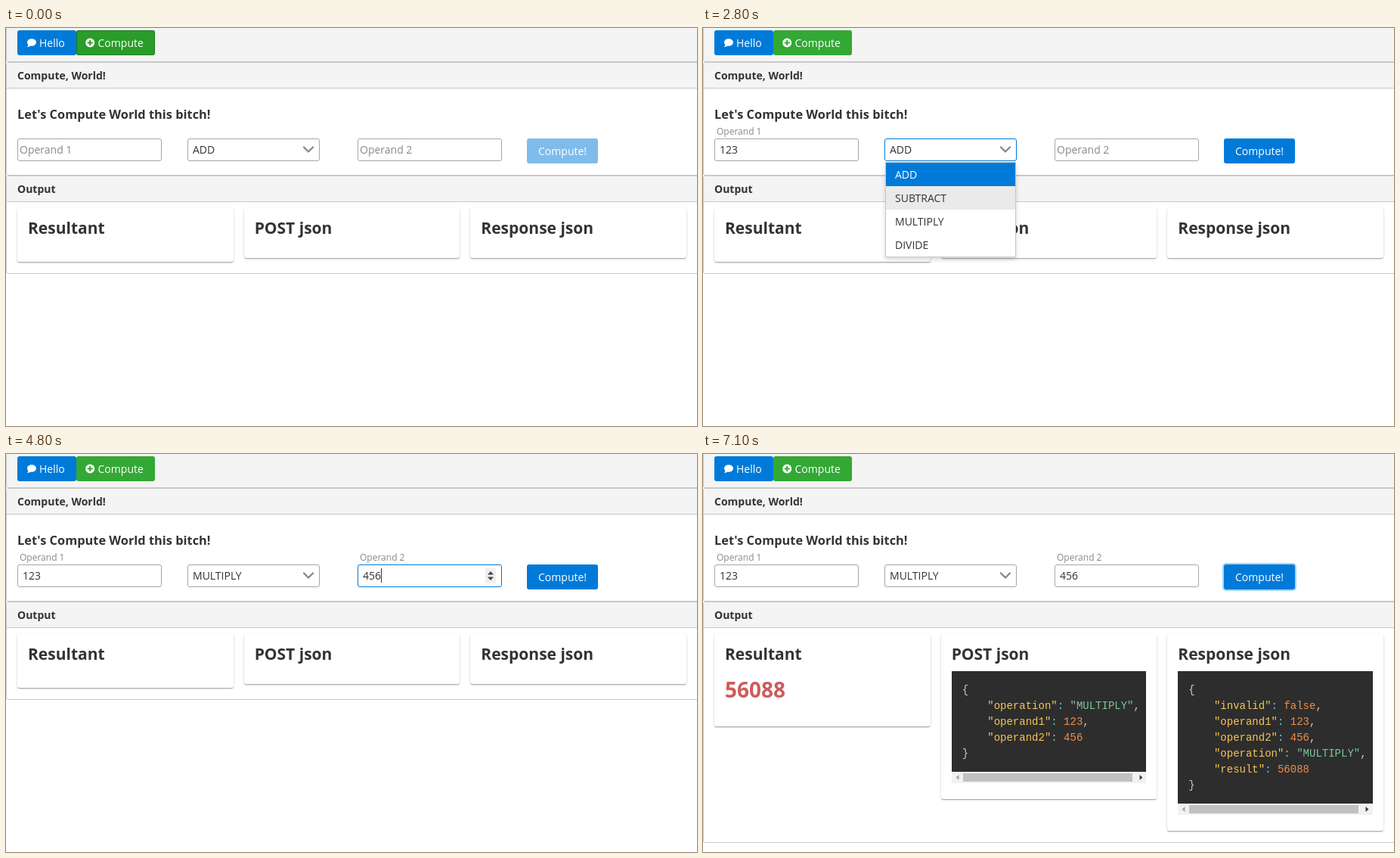
An HTML page that plays this animation: 914x526 px, repeating every 7.2 s.

```html
<!DOCTYPE html>
<html lang="en">
<head>
<meta charset="utf-8">
<title>Compute, World!</title>
<style>
html, body { margin: 0; width: 100%; height: 100%; overflow: hidden; background: #fff; }
body { position: relative; font: 14px "Open Sans", sans-serif; color: #333; }
div, span, svg, h3, pre, i { position: absolute; box-sizing: border-box; margin: 0; white-space: pre; }
b { font-weight: 700; }

/* every animation shares one clock: 1% = 72 ms */
.a { animation: 7.2s step-end infinite; }

.bar, .panel { left: 0; width: 960px; border: 1px solid #c8c8c8; border-radius: 3px; }
.bar { top: -20px; height: 65px; background: #f4f4f4; }
.head { left: 0; top: 0; width: 100%; height: 34px; background: #f4f4f4; border-bottom: 1px solid #c8c8c8; }
.head b { position: absolute; left: 14px; top: 7px; }

.btn { height: 33px; border-radius: 3px; background: #007ad9; color: #fff; }
.btn span { top: 7px; }
.field { top: 146px; height: 30px; border: 1px solid #a6a6a6; border-radius: 3px; background: #fff; }
.field > span { left: 6px; top: 4px; }
.label { color: #898989; top: 151px; }
.typed { overflow: hidden; width: 0; height: 19px; box-sizing: content-box; border-right: 1px solid transparent; }
.spin { right: 7px; top: 4px; width: 14px; height: 20px; background: #efefef; visibility: hidden; }
.spin svg { left: 0; top: 0; }

.card { top: 238px; width: 285.67px; border-radius: 3px; background: #fff; height: var(--h0); animation-name: grow;
  box-shadow: 0 1px 3px rgba(0,0,0,.2), 0 1px 1px rgba(0,0,0,.14), 0 2px 1px -1px rgba(0,0,0,.12); }
.card h3 { left: 14px; top: 12px; font-size: 21px; }
.out { visibility: hidden; animation-name: out; }
.result { left: 14px; top: 54px; font-size: 28px; font-weight: 700; color: #cd5c5c; }
pre { left: 14px; top: 49px; width: 257.67px; padding: 15px 14px 13px; overflow: hidden; background: #2d2d2d; color: #ccc;
  font: 14px/21px "Liberation Mono", monospace; }
pre * { position: static; font-style: normal; }
pre b { font-weight: 400; color: #f8c555; }
pre i { color: #f08d49; }
pre s { color: #7ec699; text-decoration: none; }
pre u { color: #67cdcc; text-decoration: none; }
.scroll { left: 14px; width: 257.67px; height: 15px; background: #f1f1f1; }
.scroll svg { left: 0; top: 0; }

.menu { left: 241px; top: 177px; width: 173px; height: 126px; border: 1px solid #c8c8c8; background: #fff;
  box-shadow: 0 3px 6px rgba(0,0,0,.16); opacity: 0; animation-name: menu; }
.menu div { left: 0; width: 100%; height: 31px; }
.menu span { left: 12px; top: 6px; }

#go { animation-name: go; --ring: 0 0 0 2.8px #8dcdff; }
#add { animation-name: add; }
#op1 { animation-name: op1; }
#sel { animation-name: sel; }
#op2 { animation-name: op2; }
#lab1 { animation-name: lab1; }
#lab2 { animation-name: lab2; }
#num1 { animation-name: num1; }
#num2 { animation-name: num2; }
#spin1 { animation-name: spin1; }
#spin2 { animation-name: spin2; }
#was { animation-name: was; }
#now { visibility: hidden; animation-name: now; }
#sub { animation-name: sub; }
#mul { animation-name: mul; }

@keyframes add {
  0% { background: #299c2a; outline: 1px dotted #0b5c0c; outline-offset: -1px; }
  1.388%, 94.444% { background: #34a835; outline: 0 none; }
  93.055% { background: #31a432; outline: 0 none; }
}
@keyframes op1 {
  0%, 33.333% { border-color: #a6a6a6; }
  4.166% { border-color: #646464; }
  5.555% { border-color: #212121; }
  8.333% { border-color: #194066; }
  9.722% { border-color: #0966ab; }
  11.111% { border-color: #007ad9; }
  31.944% { border-color: #5390c0; }
}
@keyframes spin1 { 0%, 31.944% { visibility: hidden; } 4.166% { visibility: visible; } }
@keyframes lab1 {
  0% { top: 151px; font-size: 14px; }
  8.333% { top: 147px; font-size: 13.6px; }
  9.722% { top: 133px; font-size: 12.4px; }
  11.111% { top: 128px; font-size: 12px; }
}
@keyframes num1 {
  0%, 15.277% { width: 0; border-color: transparent; }
  11.111% { width: 0; border-color: #333; }
  18.055% { width: 8px; border-color: #333; }
  19.444% { width: 16px; border-color: #333; }
  20.833% { width: 24px; border-color: #333; }
  30.555% { width: 25px; border-color: transparent; }
}
@keyframes sel {
  0%, 26.388%, 58.333% { border-color: #a6a6a6; }
  23.611% { border-color: #646464; }
  25% { border-color: #707070; }
  31.944% { border-color: #5390c0; }
  33.333% { border-color: #007ad9; }
  56.944% { border-color: #5390c0; }
}
@keyframes menu {
  0% { opacity: 0; transform: none; }
  33.333% { opacity: .45; transform: translateY(4px); }
  34.722% { opacity: .88; transform: translateY(1px); }
  36.111% { opacity: 1; transform: none; }
  45.833% { opacity: .75; transform: none; }
  47.222% { opacity: .2; transform: none; }
  48.611% { opacity: 0; transform: none; }
}
@keyframes sub { 0%, 41.666% { background: #fff; } 38.888% { background: #eaeaea; } }
@keyframes mul { 0%, 48.611% { background: #fff; } 41.666% { background: #eaeaea; } }
@keyframes was { 0% { visibility: visible; } 45.833% { visibility: hidden; } }
@keyframes now { 0% { visibility: hidden; } 45.833% { visibility: visible; } }
@keyframes op2 {
  0%, 75% { border-color: #a6a6a6; }
  50% { border-color: #646464; }
  51.388% { border-color: #212121; }
  55.555% { border-color: #194066; }
  56.944% { border-color: #0966ab; }
  58.333% { border-color: #007ad9; }
  73.611% { border-color: #5390c0; }
}
@keyframes spin2 { 0%, 73.611% { visibility: hidden; } 50% { visibility: visible; } }
@keyframes lab2 {
  0% { top: 151px; font-size: 14px; }
  55.555% { top: 147px; font-size: 13.6px; }
  56.944% { top: 133px; font-size: 12.4px; }
  58.333% { top: 128px; font-size: 12px; }
}
@keyframes num2 {
  0% { width: 0; border-color: transparent; }
  58.333% { width: 0; border-color: #333; }
  63.888% { width: 8px; border-color: #333; }
  65.277% { width: 16px; border-color: #333; }
  66.666% { width: 24px; border-color: #333; }
  73.611% { width: 25px; border-color: transparent; }
}
@keyframes go {
  0% { opacity: .5; background: #007ad9; box-shadow: none; }
  18.055% { opacity: 1; background: #007ad9; box-shadow: none; }
  72.222% { opacity: 1; background: #0975cc; box-shadow: none; }
  73.611% { opacity: 1; background: #0967b1; box-shadow: 0 0 0 1.4px #8dcdff; }
  75% { opacity: 1; background: #005b9f; box-shadow: var(--ring); }
  76.388% { opacity: 1; background: #0d66af; box-shadow: var(--ring); }
  77.777% { opacity: 1; background: #116fbf; box-shadow: var(--ring); }
  87.5% { opacity: 1; background: #0d72c6; box-shadow: var(--ring); }
  88.888% { opacity: 1; background: #0477d2; box-shadow: var(--ring); }
  90.277% { opacity: 1; background: #007ad9; box-shadow: var(--ring); }
  98.611% { opacity: 1; background: #007ad9; box-shadow: 0 0 0 2.1px rgba(141,205,255,.8); }
}
@keyframes grow { 0% { height: var(--h0); } 76.388% { height: var(--h1); } }
@keyframes out { 0% { visibility: hidden; } 76.388% { visibility: visible; } }
</style>
</head>
<body>
<svg width="0" height="0">
  <symbol id="arrows" viewBox="0 0 14 20"><path d="M3 8.5 7 4l4 4.5zM3 11.5 7 16l4-4.5z" fill="#444"/></symbol>
  <symbol id="track" viewBox="0 0 258 15">
    <path d="M15 2h224v11H15z" fill="#c1c1c1"/>
    <path d="M9.5 4v7L5.5 7.5z" fill="#a3a3a3"/>
    <path d="M248.5 4v7l4-3.5z" fill="#404040"/>
  </symbol>
</svg>

<div class="bar"></div>
<div class="btn" style="left:15px;top:3px;width:78px">
  <svg width="44" height="33" style="left:0;top:0" fill="#fff"><ellipse cx="19" cy="16" rx="6" ry="4.8"/><path d="M14.5 18q0 2.5-1.5 4 3.5 0 5-2z"/></svg>
  <span style="left:29px">Hello</span>
</div>
<div id="add" class="btn a" style="left:93px;top:3px;width:104px;background:#34a835">
  <svg width="30" height="33" style="left:0;top:0"><path fill="#fff" fill-rule="evenodd" d="M12.2 16.5a6 6 0 1 1 12 0a6 6 0 1 1-12 0zM17.2 13v2.5h-2.5v2h2.5v2.5h2v-2.5h2.5v-2h-2.5v-2.5z"/></svg>
  <span style="left:28.5px">Compute</span>
</div>

<div class="panel" style="top:45px;height:150px"><div class="head"><b>Compute, World!</b></div></div>
<h3 style="left:15px;top:103px;font-size:16.38px">Let's Compute World this bitch!</h3>

<div id="op1" class="field a" style="left:15px;width:191px">
  <span id="num1" class="typed a">123</span>
  <div id="spin1" class="spin a"><svg width="14" height="20"><use href="#arrows"/></svg></div>
</div>
<span id="lab1" class="label a" style="left:18px">Operand 1</span>

<div id="sel" class="field a" style="left:240px;width:175px">
  <span id="was" class="a">ADD</span><span id="now" class="a">MULTIPLY</span>
  <svg width="20" height="20" style="left:149px;top:4px"><path d="M4 6.5 10 12.5l6-6" fill="none" stroke="#848484" stroke-width="2.2" stroke-linecap="round" stroke-linejoin="round"/></svg>
</div>

<div id="op2" class="field a" style="left:465px;width:191px">
  <span id="num2" class="typed a">456</span>
  <div id="spin2" class="spin a"><svg width="14" height="20"><use href="#arrows"/></svg></div>
</div>
<span id="lab2" class="label a" style="left:468px">Operand 2</span>

<div id="go" class="btn a" style="left:689px;top:146px;width:94px"><span style="left:15px">Compute!</span></div>

<div class="panel a" style="top:195px;--h0:130px;--h1:319px;animation-name:grow"><div class="head"><b>Output</b></div></div>

<div class="card a" style="left:15px;--h0:71px;--h1:122px">
  <h3>Resultant</h3>
  <span class="result out a">56088</span>
</div>

<div class="card a" style="left:314.67px;--h0:66px;--h1:218px">
  <h3>POST json</h3>
  <div class="out a" style="left:0;top:0">
    <pre>{
    <b>"operation"</b><u>:</u> <s>"MULTIPLY"</s>,
    <b>"operand1"</b><u>:</u> <i>123</i>,
    <b>"operand2"</b><u>:</u> <i>456</i>
}</pre>
    <div class="scroll" style="top:182px"><svg width="258" height="15"><use href="#track"/></svg></div>
  </div>
</div>

<div class="card a" style="left:614.33px;--h0:66px;--h1:260px">
  <h3>Response json</h3>
  <div class="out a" style="left:0;top:0">
    <pre>{
    <b>"invalid"</b><u>:</u> <i>false</i>,
    <b>"operand1"</b><u>:</u> <i>123</i>,
    <b>"operand2"</b><u>:</u> <i>456</i>,
    <b>"operation"</b><u>:</u> <s>"MULTIPLY"</s>,
    <b>"result"</b><u>:</u> <i>56088</i>
}</pre>
    <div class="scroll" style="top:224px"><svg width="258" height="15"><use href="#track"/></svg></div>
  </div>
</div>

<div class="menu a">
  <div style="top:0;background:#007ad9;color:#fff"><span>ADD</span></div>
  <div id="sub" class="a" style="top:31px"><span>SUBTRACT</span></div>
  <div id="mul" class="a" style="top:62px"><span>MULTIPLY</span></div>
  <div style="top:93px"><span>DIVIDE</span></div>
</div>
</body>
</html>
```
